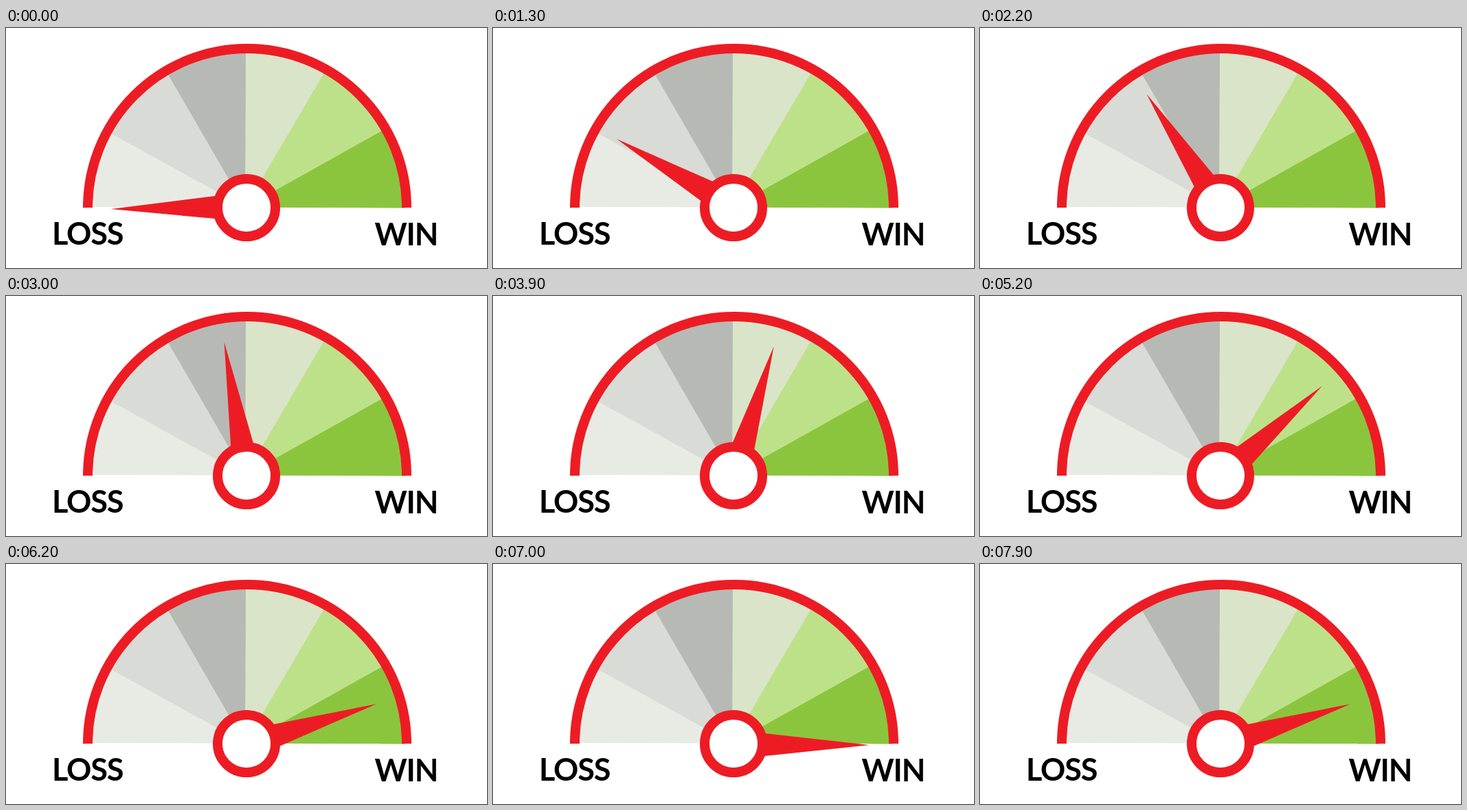
An HTML page that plays this animation: 700 px wide and 350 px high, repeating every 8000 ms.

```html
<!DOCTYPE html>
<html lang="en">
<head>
<meta charset="utf-8">
<title>Loss to win gauge</title>
<style>
  html, body { margin: 0; width: 100%; height: 100%; overflow: hidden; background: #fff; }
  svg { display: block; }
  text { font: bold 45px Lato, "Open Sans", sans-serif; letter-spacing: -1.2px; }
</style>
</head>
<body>
<svg width="700" height="350" viewBox="0 0 700 350">
  <g id="sectors"></g>
  <path d="M119 262A232 232 0 0 1 583 262" fill="none" stroke="#ed1c24" stroke-width="14"/>
  <g transform="translate(350 262)">
    <path id="needle" d="M-197.5 0L-46 -17.5L-30 -18V16L-46 15.5Z" fill="#ed1c24"/>
    <circle r="42" fill="#fff" stroke="#ed1c24" stroke-width="14"/>
  </g>
  <text x="67" y="316">LOSS</text>
  <text x="536.5" y="316.5">WIN</text>
</svg>
<script>
const LOOP = 8000, STEP = 100, TURN = 7050;

// Each sector reaches to the right end, so the next one covers it without a seam.
const sectors = [
  [121, 261, '#e8ebe4'], [149, 151.7, '#d9dbd6'], [233.5, 63.7, '#b7b9b4'],
  [349, 33, '#dae4c9'], [464.5, 62.7, '#bde189'], [551.3, 147.5, '#8bc53e']
];
document.getElementById('sectors').innerHTML = sectors.map(([x, y, color]) =>
  `<path d="M348 261.5L${x} ${y}A230 230 0 0 1 581 262.2Z" fill="${color}"/>`).join('');

// Needle sweep: time in ms, degrees above the left end.
const sweep = [
  [0, -0.6], [900, 19.3], [1300, 30.5], [1800, 44.8], [2200, 57], [2700, 71.7],
  [3600, 98.2], [3900, 107.3], [4500, 122], [5200, 138.5], [6200, 163], [7000, 180.6]
];

function angleAt(time) {
  const t = time > TURN ? 2 * TURN - time : time; // swings back the way it came
  const i = Math.max(1, sweep.findIndex(([end]) => t <= end));
  const [t0, a0] = sweep[i - 1], [t1, a1] = sweep[i];
  return a0 + (a1 - a0) * (t - t0) / (t1 - t0);
}

const needle = document.getElementById('needle');
const start = performance.now();

function draw(now) {
  const t = Math.max(0, now - start) % LOOP;
  needle.setAttribute('transform', `rotate(${angleAt(Math.floor(t / STEP) * STEP)})`);
  requestAnimationFrame(draw);
}
draw(start);
</script>
</body>
</html>
```
